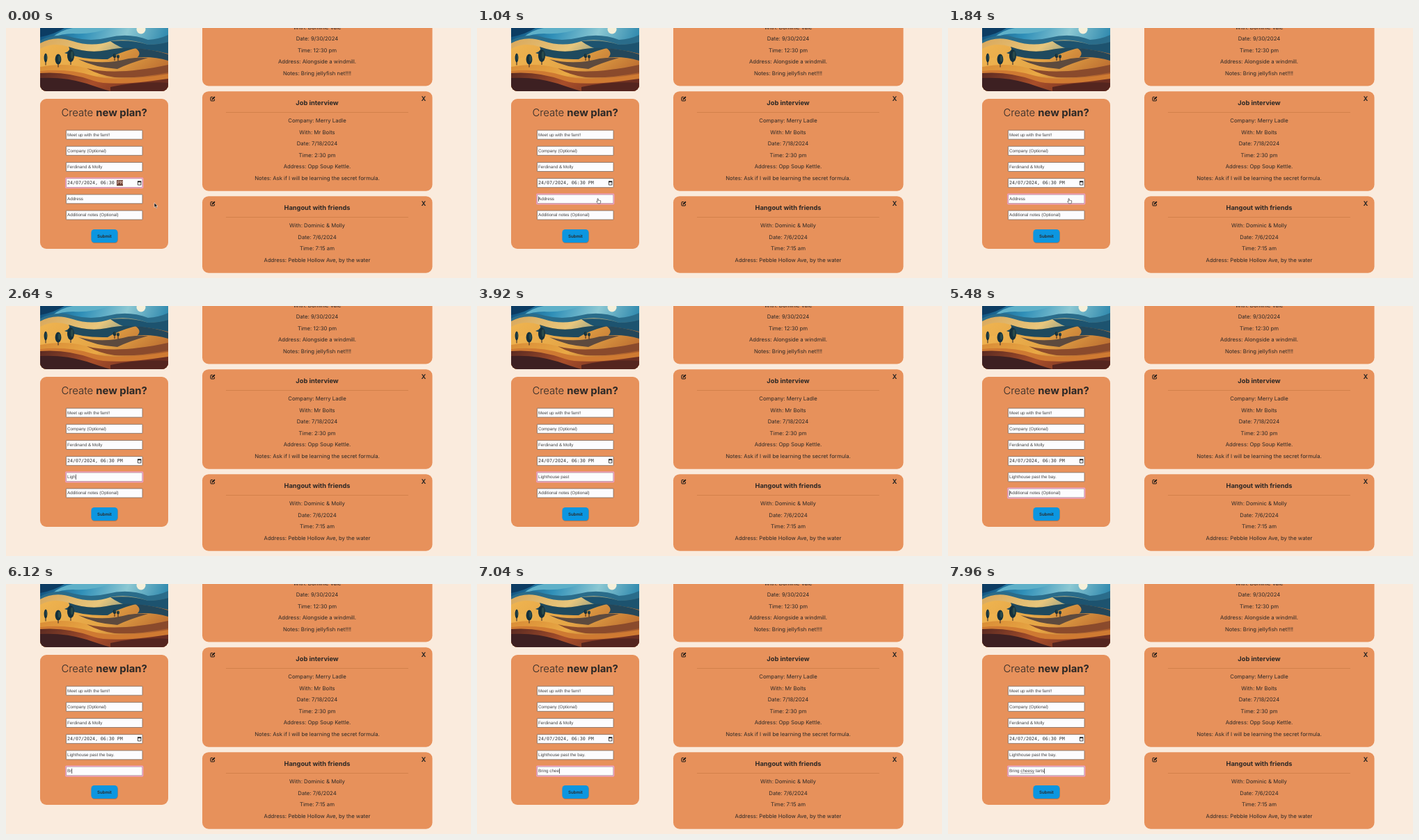
These frames come from a looping animation (668x360 px, 8000 ms). An HTML page:

```html
<!DOCTYPE html>
<html lang="en">
<head>
<meta charset="utf-8">
<title>Planner</title>
<style>
html, body { margin: 0; width: 100%; height: 100%; overflow: hidden; background: #faebdd; }
svg { display: block; width: 668px; height: 360px; }
text { font-family: Inter, sans-serif; fill: #2c2826; white-space: pre; text-rendering: geometricPrecision; }
.card { fill: #e7915b; }
.line { font-size: 7.75px; text-anchor: middle; }
.head { font-size: 9.25px; font-weight: 700; text-anchor: middle; }
.field { fill: #fcfcfe; stroke: #7d6a60; stroke-width: .8; }
.focus { fill: none; stroke: #ee9fc4; stroke-width: 1.5; }
.input { font: 6.25px "Liberation Sans", Arial, sans-serif; fill: #444; }
.mono { font: 6.64px "DejaVu Sans Mono", monospace; fill: #333; }
</style>
</head>
<body>
<svg id="stage" viewBox="0 0 668 360"></svg>
<script>
const LOOP = 8000;
const FIELD_X = 86.4, FIELD_TOP = 147.2, FIELD_STEP = 23.15, TEXT_X = 88;
const ADDRESS = "Lighthouse past the bay.";
const NOTES = "Bring cheesy tarts";

const rect = (x, y, w, h, r, attrs) =>
  `<rect x="${x}" y="${y}" width="${w}" height="${h}" rx="${r}" ${attrs}/>`;
const text = (x, y, cls, str, attrs = "") =>
  `<text x="${x}" y="${y}" class="${cls}" ${attrs}>${str.replace(/&/g, "&amp;")}</text>`;
const path = (d, fill, attrs = "") => `<path d="${d}" fill="${fill}" ${attrs}/>`;
const gradient = (id, x2, y2, ...colors) =>
  `<linearGradient id="${id}" x2="${x2}" y2="${y2}">` + colors.map((c, i) =>
    `<stop offset="${i / (colors.length - 1)}" stop-color="${c}"/>`).join("") + "</linearGradient>";
const fieldY = i => FIELD_TOP + i * FIELD_STEP;

function planCard(top, height, title, lines) {
  const icon = `<g transform="translate(293.5 ${top + 7})" fill="none" stroke="#111">
    <path d="M3.4 1.2H1.2Q.5 1.2 .5 2V6Q.5 6.7 1.2 6.7H5.2Q6 6.7 6 6V4.2"/>
    <path d="M2.7 4.7L6.3 1" stroke-width="1.9"/></g>`;
  return rect(282, top, 330.5, height, 9, 'class="card"') + icon +
    text(599.8, top + 14, "head", "X") +
    text(447, top + 19.4, "head", title) +
    rect(316, top + 30, 262, 0.8, 0, 'fill="#cf7d48"') +
    lines.map((s, i) => text(447, top + 45.1 + i * 16.5, "line", s)).join("");
}

function tree(x, y, rx, ry) {
  return rect(x - 0.5, y, 1, ry + 4, 0, 'fill="#2b2024"') +
    `<ellipse cx="${x}" cy="${y}" rx="${rx}" ry="${ry}" fill="#14303c"/>` +
    `<ellipse cx="${x + rx * 0.35}" cy="${y - 1}" rx="${rx * 0.4}" ry="${ry * 0.6}" fill="#2a4a4a"/>`;
}

function landscape() {
  return `<defs><clipPath id="frame"><rect x="49" y="-20" width="184" height="111" rx="9"/></clipPath>` +
    gradient("sky", 1, 0.2, "#0f4f7c", "#2f8fb8", "#8cc8d3", "#2b86ac") +
    gradient("far", 1, 0.3, "#d9a75a", "#e8c67c", "#2f6f8a") +
    gradient("gold", 1, 0.4, "#efb450", "#e4a546", "#b9692f") +
    gradient("amber", 1, 0.4, "#d98c36", "#e9a945", "#a4552b") +
    gradient("rust", 1, 0.2, "#5a2a22", "#a94f2a", "#6b2e22") +
    `</defs><g clip-path="url(#frame)">` +
    rect(49, 0, 184, 91, 0, 'fill="url(#sky)"') +
    path("M49 0H84Q70 9 49 13Z", "#0c3c63") +
    path("M96 0H150Q122 10 96 8Q80 8 66 14Q78 3 96 0Z", "#5fb0c8") +
    '<circle cx="194" cy="2" r="6.5" fill="#f6f0da"/>' +
    // distant ridges
    path("M49 18Q72 6 98 14Q122 20 146 14Q176 6 204 17Q220 16 233 10V60H49Z", "#2a6c8a") +
    path("M49 22Q70 10 96 19Q124 28 150 19Q176 14 204 24Q220 24 233 20V60H49Z", "url(#far)") +
    path("M150 19Q180 16 204 24Q220 24 233 20V42Q200 38 178 32Q162 28 150 19Z", "#1d536f") +
    // middle dunes with blue shade
    path("M49 30Q68 20 90 27Q118 37 144 32Q180 24 233 37V80H49Z", "url(#gold)") +
    path("M90 27Q118 37 144 32Q166 27 186 29Q160 36 146 45Q110 46 84 36Q94 33 90 27Z", "#1f4a5e") +
    path("M186 29Q212 31 233 38V56Q206 52 188 43Q196 36 186 29Z", "#24475a") +
    path("M49 47Q74 38 104 45Q140 54 176 44Q206 39 233 47V91H49Z", "url(#gold)") +
    path("M104 45Q140 54 176 44Q190 42 204 43Q176 51 160 59Q128 57 104 45Z", "#5d4a3e") +
    // foreground
    path("M49 56Q84 49 116 58Q158 69 233 53V91H49Z", "url(#amber)") +
    path("M116 58Q158 69 233 53V64Q190 73 156 71Q134 68 116 58Z", "#8a4a2c") +
    path("M49 62Q88 58 122 68Q160 79 233 66V91H49Z", "#cf7a32") +
    path("M49 65Q88 62 126 76Q152 85 233 73V91H49Z", "url(#rust)") +
    path("M49 72Q84 70 116 80Q136 87 150 91H49Z", "#3d2022") +
    path("M150 85Q190 76 233 79V91H150Z", "#54251f") +
    tree(57, 43, 2.4, 6.5) + tree(75, 45, 4.4, 7.5) + tree(93, 40, 5, 9) +
    tree(156, 40, 2.4, 3) + tree(161, 41, 2, 2.5) + "</g>";
}

function form() {
  const labels = ["Meet up with the fam!!", "Company (Optional)", "Ferdinand & Molly", "", "", ""];
  return rect(49, 102, 184, 216, 9, 'class="card"') +
    `<text x="79.4" y="127" font-size="14.85" font-weight="300">Create <tspan font-weight="700">new plan?</tspan></text>` +
    labels.map((s, i) =>
      rect(FIELD_X, fieldY(i), 109.6, 13, 0.5, 'class="field"') +
      text(TEXT_X, fieldY(i) + 8.4, "input", s, `id="field${i}"`)).join("") +
    rect(85.8, 0, 110.8, 14.4, 1, 'class="focus" id="focus"') +
    rect(159, 219, 9, 8.2, 0, 'fill="#6b3f34" id="mark"') +
    text(TEXT_X, fieldY(3) + 8.4, "mono", '24/07/2024, 06:30 <tspan id="period">PM</tspan>') +
    path("M189.4 221.2H193.8V226H189.4Z", "none", 'stroke="#222" stroke-width=".8"') +
    path("M189 220.3H194.2V222.2H189Z", "#222") +
    path("M104.2 272.7H124", "none", 'id="spelling" stroke="#777" stroke-width=".8" stroke-dasharray="1.2 .5"') +
    rect(0, 0, 0.7, 7.4, 0, 'id="caret" fill="#222"') +
    rect(122.8, 291, 38, 19, 4.5, 'fill="#b5744c"') +
    rect(122.4, 290, 38, 19, 4.5, 'fill="#0c96e0"') +
    text(141.4, 301.6, "line", "Submit", 'style="font-size:6.1px;font-weight:600"');
}

const pointer = `<g id="pointer" stroke="#fff" stroke-width=".6" stroke-linejoin="round">
  <path id="arrow" fill="#111" d="M0 0V6.6L1.6 5.2L2.7 7.7L3.9 7.2L2.8 4.8H4.9Z"/>
  <path id="hand" fill="#fff" stroke="#222" d="M-.5 .6Q0 -.3 .6 .6V3L1.2 2.6L2 3L2.7 2.8L3.2 3.3L4.1 3.4Q4.5 5.6 3.4 7.4H.2L-1.9 4.6Q-1.6 3.6 -.5 4.6Z"/></g>`;

const stage = document.getElementById("stage");
stage.innerHTML = rect(0, 0, 668, 360, 0, 'fill="#faebdd"') + landscape() + form() +
  planCard(-43.4, 126.8, "", ["With: Dominic Vale", "Date: 9/30/2024", "Time: 12:30 pm",
    "Address: Alongside a windmill.", "Notes: Bring jellyfish net!!!!"]) +
  planCard(91.2, 143.5, "Job interview", ["Company: Merry Ladle", "With: Mr Bolts", "Date: 7/18/2024",
    "Time: 2:30 pm", "Address: Opp Soup Kettle.", "Notes: Ask if I will be learning the secret formula."]) +
  planCard(242.2, 110.5, "Hangout with friends", ["With: Dominic & Molly", "Date: 7/6/2024",
    "Time: 7:15 am", "Address: Pebble Hollow Ave, by the water"]) + pointer;

const el = id => document.getElementById(id);
const show = (id, on) => el(id).setAttribute("visibility", on ? "visible" : "hidden");
const clamp = v => Math.max(0, Math.min(1, v));
const typed = (t, start, end, count) => Math.floor(clamp((t - start) / (end - start)) * count + 1e-6);

function render(t) {
  // Address is typed in two bursts around a short pause.
  const addressCount = typed(t, 2300, 3400, 16) + typed(t, 4020, 4800, 8);
  const notesCount = typed(t, 5880, 7920, 18);
  el("field4").textContent = ADDRESS.slice(0, addressCount) || "Address";
  el("field5").textContent = NOTES.slice(0, notesCount) || "Additional notes (Optional)";

  const active = t < 960 ? 3 : t < 5400 ? 4 : 5;
  el("focus").setAttribute("y", fieldY(active) - 0.7);
  show("mark", active === 3);
  el("period").style.fill = active === 3 ? "#f5d9cc" : "#333";
  show("spelling", notesCount > 12);

  const hasText = active === 4 ? addressCount : notesCount;
  const width = hasText ? el("field" + active).getComputedTextLength() : 0;
  el("caret").setAttribute("x", TEXT_X + width + 0.1);
  el("caret").setAttribute("y", fieldY(active) + 2.7);
  const idle = [[960, 2300], [3400, 4020], [4800, 5400], [5400, 5880]].find(([a, b]) => t >= a && t < b);
  const blinkOn = !idle || (t - idle[0]) % 1000 < 500;
  show("caret", active > 3 && blinkOn);

  const p = clamp((t - 200) / 650), ease = p * p * (3 - 2 * p);
  const x = 213 - 39.5 * ease, y = 251.7 - 6.4 * ease;
  el("pointer").setAttribute("transform", `translate(${x} ${y})`);
  const visible = t < 2300;
  show("arrow", visible && x >= 196);
  show("hand", visible && x < 196);
}

const begin = performance.now();
function tick() {
  render((performance.now() - begin) % LOOP);
  requestAnimationFrame(tick);
}
tick();
</script>
</body>
</html>
```
